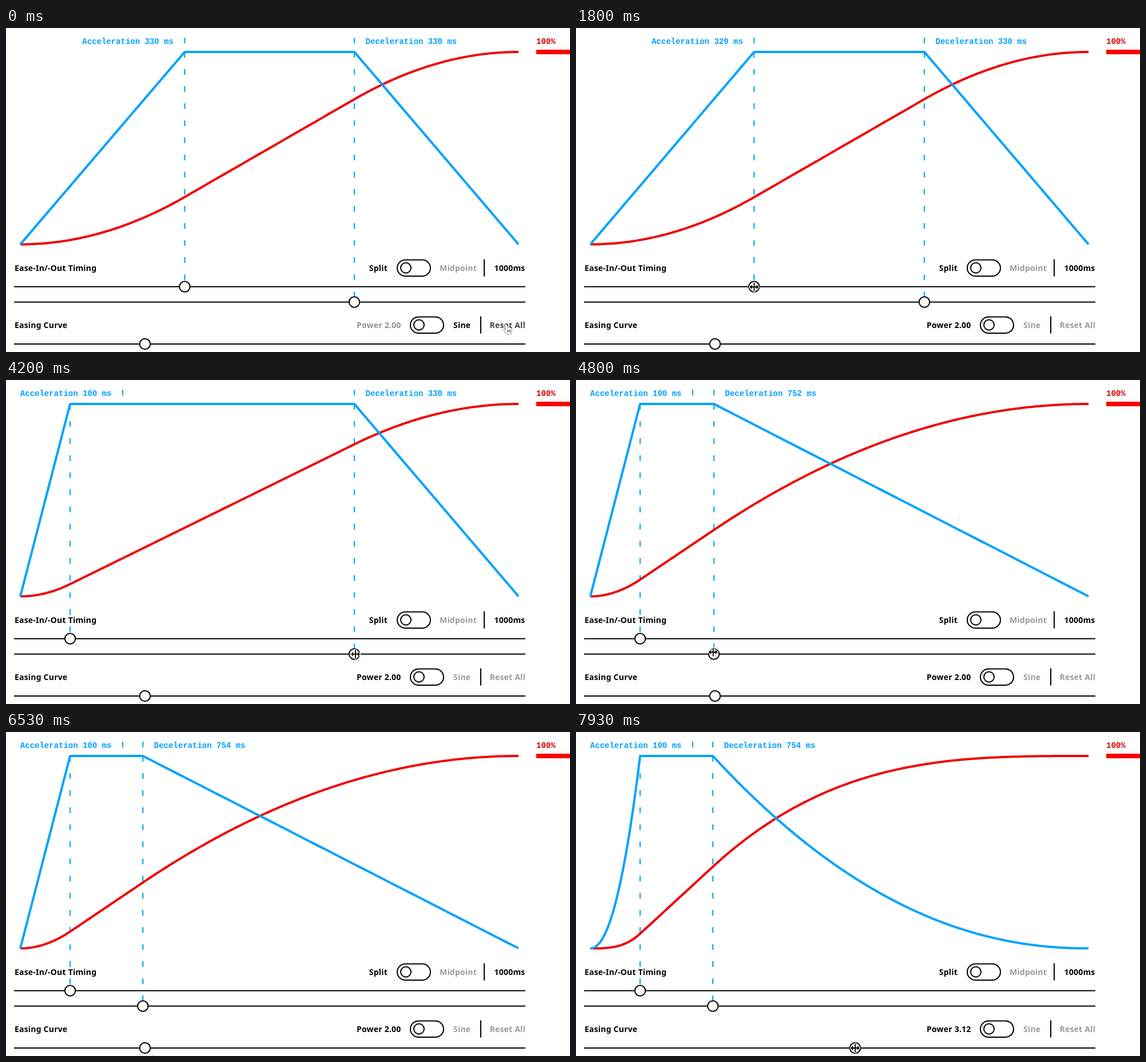
These frames come from a looping animation (986x568 px, 8 s). An HTML page:

```html
<!DOCTYPE html>
<html lang="en">
<head>
<meta charset="utf-8">
<title>Easing curve editor</title>
<style>
  html, body { margin: 0; width: 100%; height: 100%; overflow: hidden; background: #fff; }
  svg { display: block; width: 986px; height: 568px; }
  text { font: 600 14px "Noto Sans", sans-serif; letter-spacing: .2px; white-space: pre; }
  .mono { font: 700 14px "Liberation Mono", monospace; letter-spacing: 0; fill: #00a0ff; }
  .end { text-anchor: end; }
  .off { fill: #9b9b9b; }
  .ink { fill: #fff; stroke: #000; stroke-width: 2; }
  .curve { fill: none; stroke-width: 4; stroke-linejoin: round; }
  .guide { stroke: #1caeee; stroke-width: 2.4; }
  .dash { stroke-dasharray: 10 20; }
  .cursor { stroke: #fff; stroke-linejoin: round; paint-order: stroke; }
</style>
</head>
<body>
<svg viewBox="0 0 986 568">
  <g class="guide">
    <path id="accelTick" d="M0 17V27"/>
    <path id="decelTick" d="M0 17V27"/>
    <path id="accelDash" class="dash" d="M0 42V444"/>
    <path id="decelDash" class="dash" d="M0 42V471"/>
  </g>
  <path id="position" class="curve" stroke="#f00000"/>
  <path id="velocity" class="curve" stroke="#00a2ff"/>
  <text id="accelLabel" class="mono end" y="28"></text>
  <text id="decelLabel" class="mono" y="28"></text>
  <text class="mono" x="927" y="28" style="fill:#d00000">100%</text>
  <rect x="927" y="38" width="59" height="8" fill="#fa0000"/>

  <text x="15" y="426">Ease-In/-Out Timing</text>
  <text class="end" x="667" y="426">Split</text>
  <text class="off" x="758" y="426">Midpoint</text>
  <text class="end" x="907.5" y="426">1000ms</text>
  <text x="15" y="526">Easing Curve</text>
  <text id="power" class="end" x="690.5" y="526"></text>
  <text id="sine" x="782" y="526">Sine</text>
  <text id="reset" class="end" x="908" y="526">Reset All</text>

  <g class="ink">
    <rect x="684" y="406.5" width="58" height="28.5" rx="14.25"/>
    <circle cx="699" cy="420.5" r="9"/>
    <rect x="707" y="506.5" width="58" height="28.5" rx="14.25"/>
    <circle cx="722" cy="520.5" r="9"/>
    <path d="M836 405.5v30M830 505.5v30M14 453.5H908M14 480.5H908M14 554H908"/>
    <circle id="accelThumb" cy="453.5" r="9.2"/>
    <circle id="decelThumb" cy="480.5" r="9.2"/>
    <circle id="powerThumb" cy="554" r="9.2"/>
  </g>

  <g id="cursor" class="cursor">
    <path id="arrow" stroke-width="2" d="M0 0V16L3.7 12.5L6.2 18.2L8.6 17.2L6.2 11.6H11.3Z"/>
    <path id="resize" stroke-width="2.4"
      d="M-.9 -7.5H.9V-1H4V-4L8 0L4 4V1H.9V7.5H-.9V1H-4V4L-8 0L-4 -4V-1H-.9Z"/>
    <g id="hand" fill="#fff" stroke="#333" stroke-width="1.2">
      <path d="M-4.5 -7Q-3 -8.5 -1.8 -6.5L0 -2Q1.5 -3.5 2.8 -2Q4.3 -3 5.2 -1.2Q7 -1.6 7 .8L6.5 5L5 9H-2L-6.5 2.5Q-7 .3 -4.8 1L-3 2.5L-5 -5Q-5.2 -6.3 -4.5 -7Z"/>
      <path d="M-.4 2V6M2 2V6M4.2 2V6" stroke-width="1"/>
    </g>
  </g>
</svg>
<script>
const LOOP = 8000, LEFT = 25, WIDTH = 871, TOP = 42, BOTTOM = 379.3;
const el = {};
document.querySelectorAll('[id]').forEach(node => el[node.id] = node);

const xOf = t => LEFT + WIDTH * t;
const yOf = v => BOTTOM - (BOTTOM - TOP) * v;
const mix = (a, b, k) => a + (b - a) * k;
const smooth = (now, from, to) => {
  const k = Math.min(1, Math.max(0, (now - from) / (to - from)));
  return k * k * (3 - 2 * k);
};
const grey = v => `rgb(${v},${v},${v})`;

// Stops of the pointer: [time, x, y], eased in between.
const stops = [
  [0, 877, 527], [420, 877, 527], [1450, 311.7, 454],
  [1770, 312.5, 454], [2480, 112.8, 456.5], [2750, 112.8, 456.5],
  [3800, 611, 480.5], [4235, 611, 480.5], [4825, 238, 477], [5100, 238, 477],
  [5850, 268, 584], [6400, 264, 574], [6720, 243, 554],
  [6950, 243, 554], [7880, 488, 554], [LOOP, 488, 554]
];

function pointerAt(now) {
  const i = stops.findIndex(s => s[0] > now);
  const a = stops[i - 1], b = stops[i];
  const k = smooth(now, a[0], b[0]);
  return [mix(a[1], b[1], k), mix(a[2], b[2], k)];
}

function drawCurves(accel, start, power) {
  const decel = 1 - start;
  const total = accel / power + start - accel + decel / power;
  const speed = t => Math.pow(t < accel ? t / accel : t > start ? (1 - t) / decel : 1, power - 1);
  const place = t =>
    t < accel ? accel / power * Math.pow(t / accel, power) / total :
    t > start ? 1 - decel / power * Math.pow((1 - t) / decel, power) / total :
    (accel / power + t - accel) / total;
  const times = [accel, start];
  for (let i = 0; i <= 200; i++) times.push(i / 200);
  times.sort((a, b) => a - b);
  const path = f => 'M' + times.map(t => `${xOf(t).toFixed(2)} ${yOf(f(t)).toFixed(2)}`).join('L');
  el.velocity.setAttribute('d', path(speed));
  el.position.setAttribute('d', path(place));
}

const shift = (node, x, y = 0) => node.setAttribute('transform', `translate(${x} ${y})`);
const show = (node, on) => node.style.display = on ? '' : 'none';

function render(now) {
  const accel = mix(.33, .1, smooth(now, 1770, 2480));
  const start = mix(.6705, .246, smooth(now, 4235, 4825));
  const powerX = mix(243, 488, smooth(now, 6950, 7880));
  const power = 2 + (powerX - 243) / 218.75;
  const accelX = xOf(accel), decelX = xOf(start);
  const tickX = Math.max(accelX, 204);

  drawCurves(accel, start, power);
  shift(el.accelTick, tickX);
  shift(el.accelDash, accelX);
  shift(el.decelTick, decelX);
  shift(el.decelDash, decelX);
  el.accelLabel.setAttribute('x', tickX - 19.5);
  el.accelLabel.textContent = `Acceleration ${Math.round(accel * 1000)} ms`;
  el.decelLabel.setAttribute('x', decelX + 19.5);
  el.decelLabel.textContent = `Deceleration ${Math.round((1 - start) * 1000)} ms`;
  el.accelThumb.setAttribute('cx', accelX);
  el.decelThumb.setAttribute('cx', decelX);
  el.powerThumb.setAttribute('cx', powerX);

  const swap = smooth(now, 0, 300);
  el.power.textContent = `Power ${power.toFixed(2)}`;
  el.power.style.fill = grey(mix(145, 0, swap));
  el.sine.style.fill = grey(mix(0, 155, swap));
  el.reset.style.fill = grey(mix(68, 155, smooth(now, 550, 850)));

  const [x, y] = pointerAt(now);
  const near = (tx, ty) => Math.hypot(x - tx, y - ty) < 10;
  const hand = now < 680;
  const grip = near(accelX, 453.5) || near(decelX, 480.5) || near(powerX, 554);
  shift(el.cursor, x, y);
  show(el.hand, hand);
  show(el.resize, !hand && grip);
  show(el.arrow, !hand && !grip);
}

const begin = performance.now();
function tick() {
  render((performance.now() - begin) % LOOP);
  requestAnimationFrame(tick);
}
tick();
</script>
</body>
</html>
```
